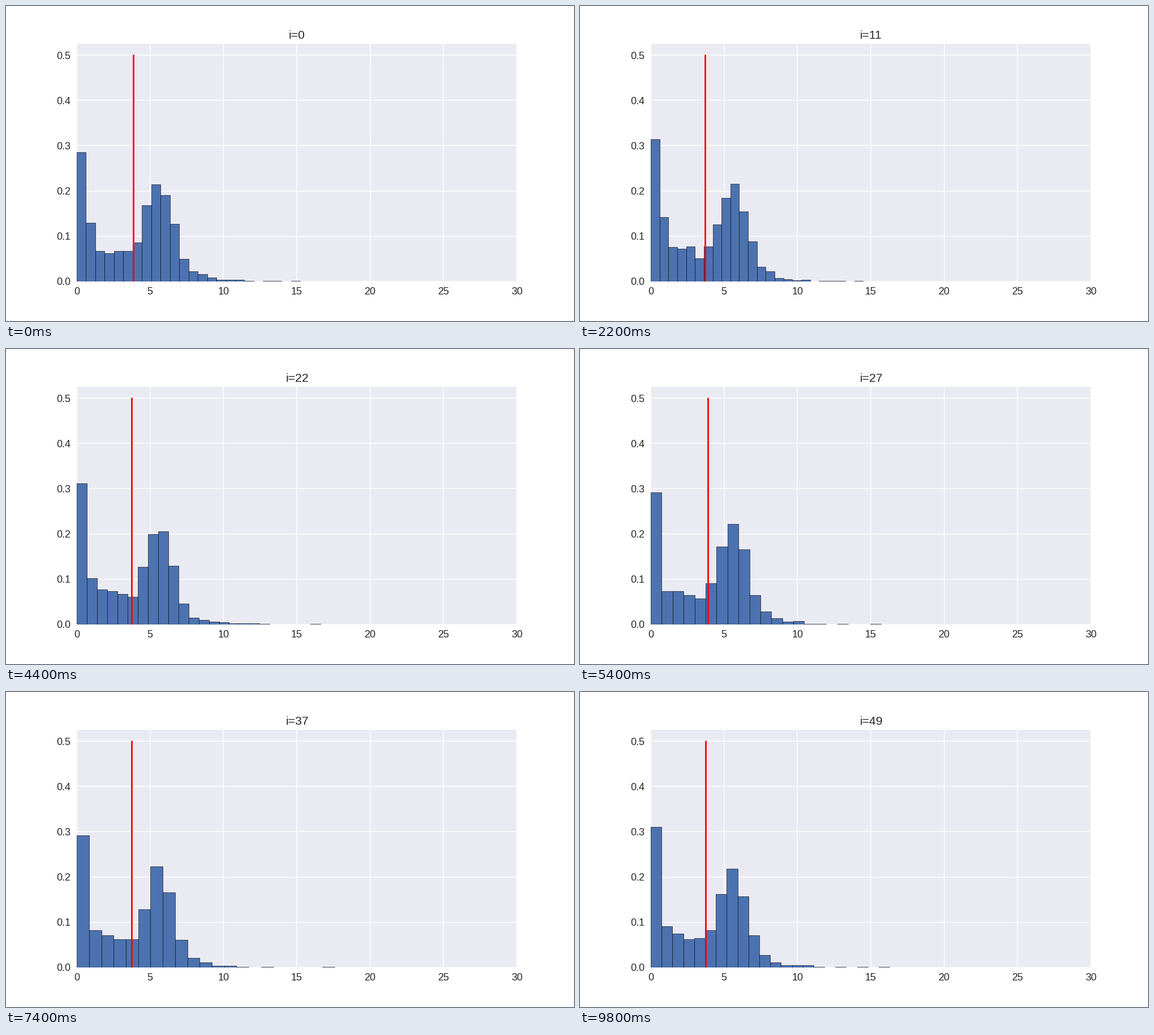
These frames come from a looping animation (1004 px wide and 558 px high, 10 s). A matplotlib script:

```python
import numpy as np
import matplotlib.pyplot as plt
from matplotlib.animation import FuncAnimation
from matplotlib.patches import Rectangle

W, H, DPI = 1004, 558, 64
PX = 72 / DPI  # points per pixel
FRAMES, INTERVAL = 50, 200
SAMPLES = 1500
INK = "#262626"

plt.rcParams["font.family"] = "Liberation Sans"


def density(x):
    """Step near zero, falling ramp, main peak and long right tail."""
    step = 0.205 * (x < 0.8)
    ramp = (0.092 - 0.01 * x) * (x < 5)
    peak = 0.42 * np.exp(-((x - 5.6) / 0.75) ** 2 / 2) / (0.75 * np.sqrt(2 * np.pi))
    tail = 0.08 / 1.4 * np.exp(-(x - 6.4) / 1.4) * (x > 6.4)
    return step + ramp + peak + tail


grid = np.linspace(0, 20, 2001)
cdf = np.cumsum(density(grid))
cdf = (cdf - cdf[0]) / (cdf[-1] - cdf[0])


def bin_width(i):
    return 0.705 - 0.115 * np.cos(2 * np.pi * (i - 8) / 58)


def histogram(i):
    """Mean, bin edges and densities of draw i."""
    rng = np.random.default_rng(i)
    # Half the draws are evenly spread, which keeps the noise low.
    half = SAMPLES // 2
    u = np.append((np.arange(half) + 0.5) / half, rng.random(half))
    x = np.append(np.interp(u, cdf, grid), rng.triangular(13.5, 15, 21.5))
    bins = round(np.ptp(x) / bin_width(i))
    h, edges = np.histogram(x, bins, density=True)
    return x.mean(), edges, h


fig = plt.figure(figsize=(W / DPI, H / DPI), dpi=DPI, facecolor="white")
ax = fig.add_axes([125 / W, 70 / H, 778 / W, 421 / H], facecolor="#EAEAF2")
ax.set_xlim(0, 30)
ax.set_ylim(0, 0.525)
ax.set_xticks(range(0, 31, 5))
ax.set_yticks(np.arange(6) / 10)
ax.set_axisbelow(True)
ax.grid(color="white", linewidth=1.5 * PX)
ax.tick_params(length=0, labelsize=18 * PX, labelcolor=INK)
ax.tick_params(axis="x", pad=9.7 * PX)
ax.tick_params(axis="y", pad=11 * PX)
for spine in ax.spines.values():
    spine.set_visible(False)

title = fig.text(514.5 / W, 1 - 58 / H, "", ha="center", va="baseline",
                 fontsize=21.3 * PX, color=INK)
bars = [ax.add_patch(Rectangle((0, 0), 0, 0, facecolor="#4C72B0",
                               edgecolor="black", linewidth=0.6 * PX))
        for _ in range(45)]
mean_line, = ax.plot([0, 0], [0, 0.5], color="red", linewidth=2.8 * PX,
                     solid_capstyle="round")


def draw(i):
    mean, edges, h = histogram(i)
    for k, bar in enumerate(bars):
        shown = k < len(h) and h[k] > 0
        bar.set_visible(shown)
        if shown:
            bar.set_bounds(edges[k], 0, edges[k + 1] - edges[k], h[k])
    mean_line.set_xdata([mean, mean])
    title.set_text(f"i={i}")
    return [*bars, mean_line, title]


anim = FuncAnimation(fig, draw, frames=FRAMES, interval=INTERVAL, repeat=True,
                     repeat_delay=0)
plt.show()
```
